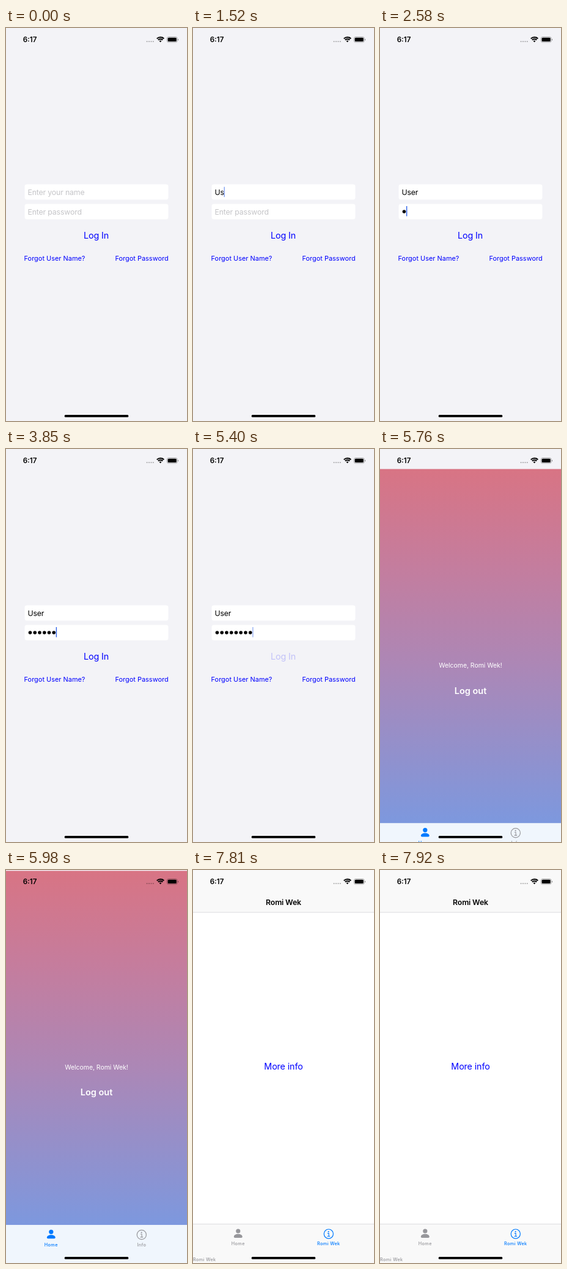
An HTML page for the animation above (8 s loop, 296x640 px).

```html
<!DOCTYPE html>
<html lang="en">
<head>
<meta charset="utf-8">
<title>Login flow</title>
<style>
html, body { margin: 0; width: 100%; height: 100%; overflow: hidden; background: #f3f3f7; }
svg { display: block; width: 296px; height: 640px; font-family: Inter, Roboto, sans-serif; }
.field { font-size: 12.3px; letter-spacing: -.012em; }
.hint { fill: #c5c5c8; }
.link { fill: #00f; }
.small { font-size: 10.95px; }
.big { font-size: 14.3px; letter-spacing: -.008em; }
.semi { font-weight: 600; }
.mid { text-anchor: middle; }
.end { text-anchor: end; }
.tab { font-size: 7.3px; font-weight: 500; letter-spacing: .05em; }
</style>
</head>
<body>
<svg viewBox="0 0 296 640">
  <defs>
    <linearGradient id="sky" x1="0" y1="0" x2="0" y2="1">
      <stop offset="0" stop-color="#d87484"/>
      <stop offset=".25" stop-color="#c47d9e"/>
      <stop offset=".5" stop-color="#ac87b6"/>
      <stop offset=".9" stop-color="#7d98de"/>
      <stop offset="1" stop-color="#7398e4"/>
    </linearGradient>
  </defs>

  <rect width="296" height="640" fill="#f3f3f7"/>
  <g id="login">
    <rect x="30.5" y="254.5" width="235" height="25" rx="4" fill="#fff"/>
    <rect x="30.5" y="286.5" width="235" height="25" rx="4" fill="#fff"/>
    <text id="nameHint" class="field hint" x="35.4" y="271.6">Enter your name</text>
    <text id="passHint" class="field hint" x="35.4" y="303.6">Enter password</text>
    <text id="name" class="field" x="35.4" y="271.6"></text>
    <g id="dots"></g>
    <rect id="caret" width="1.4" height="16.5" fill="#2f62e8"/>
    <text id="loginBtn" class="big link mid" x="147.6" y="342.8">Log In</text>
    <text class="small link" x="29.6" y="378.5">Forgot User Name?</text>
    <text class="small link end" x="265.6" y="378.5">Forgot Password</text>
  </g>

  <g id="sheet">
    <g id="home">
      <rect width="296" height="640" fill="url(#sky)"/>
      <g fill="#fff" class="mid">
        <text x="148" y="323.8" font-size="10.5" letter-spacing="-.05">Welcome, Romi Wek!</text>
        <text class="semi" x="148" y="366" font-size="14.5">Log out</text>
      </g>
    </g>
    <g id="info">
      <rect width="296" height="640" fill="#fff"/>
      <rect width="296" height="69" fill="#f9f9f9"/>
      <rect y="68.6" width="296" height=".8" fill="#d3d3d6"/>
      <text class="field semi mid" x="148" y="56.6">Romi Wek</text>
      <text class="big link mid" x="148" y="325.2">More info</text>
    </g>
    <rect id="bar" y="576.6" width="296" height="64"/>
    <rect id="barLine" y="576.3" width="296" height=".8" fill="#d3d3d6"/>
    <g id="homeTab">
      <circle cx="73.8" cy="588" r="3.6"/>
      <path d="M66.9 597.2C66.9 594.4 70 592.8 73.8 592.8S80.7 594.4 80.7 597.2Q80.7 599 79 599H68.6Q66.9 599 66.9 597.2Z"/>
      <text class="tab mid" x="73.8" y="611.2">Home</text>
    </g>
    <g id="infoTab">
      <circle cx="221.8" cy="592.6" r="7.6" fill="none" stroke="currentColor" stroke-width="1.2"/>
      <circle cx="221.6" cy="589" r="1.1"/>
      <path d="M219.9 591.6H222.1V596.4M219.6 596.5H224.2" fill="none" stroke="currentColor" stroke-width="1.1"/>
      <text id="infoLabel" class="tab mid" x="221.8" y="611.2"></text>
    </g>
    <text id="stray" class="tab" x="0" y="637" fill="#97979b">Romi Wek</text>
  </g>

  <g id="status">
    <text class="semi" x="27.7" y="23.1" font-size="11.6">6:17</text>
    <g opacity=".3">
      <circle cx="230.6" cy="22" r="1.1"/><circle cx="234" cy="22" r="1.1"/>
      <circle cx="237.4" cy="22" r="1.1"/><circle cx="240.8" cy="22" r="1.1"/>
    </g>
    <g fill="none" stroke="#000" stroke-width="2">
      <path d="M246.7 17.4A8.2 8.2 0 0 1 258.3 17.4"/>
      <path d="M248.8 19.5A5.2 5.2 0 0 1 256.2 19.5"/>
    </g>
    <path d="M250.6 21.3A2.7 2.7 0 0 1 254.4 21.3L252.5 23.3Z"/>
    <rect x="263.3" y="14.5" width="16.8" height="8.8" rx="2.7" fill="none" stroke="#000" stroke-opacity=".4" stroke-width=".8"/>
    <rect x="264.6" y="15.8" width="14.2" height="6.2" rx="1.5"/>
    <path d="M281 17.4Q282.2 18 282.2 18.9T281 20.4Z" opacity=".45"/>
    <rect x="95.6" y="630.1" width="104.8" height="3.7" rx="1.85"/>
  </g>
</svg>
<script>
const LOOP = 8000;
const el = id => document.getElementById(id);
const show = (id, on) => el(id).style.display = on ? '' : 'none';

const nameKeys = [1130, 1520, 1640, 1960];
const passKeys = [2580, 2760, 3060, 3180, 3380, 3850, 4240, 4430];
const slideTimes = [5520, 5640, 5760, 5870, 5980];
const caretSteps = [[0, 0], [500, .45], [630, 1], [1520, .6], [1640, 1],
  [4930, .45], [5040, 0], [5280, .25], [5400, .5], [5520, 1]];
const buttonSteps = [[0, 1], [5280, .2], [5520, .6], [5640, 1]];

const count = (times, t) => times.filter(k => k <= t).length;
const stepValue = (steps, t) => steps.filter(s => s[0] <= t).pop()[1];

const dots = passKeys.map((_, i) => {
  const c = document.createElementNS('http://www.w3.org/2000/svg', 'circle');
  c.setAttribute('cx', 39.5 + 7.75 * i);
  c.setAttribute('cy', 299);
  c.setAttribute('r', 2.8);
  el('dots').append(c);
  return c;
});

// Critically damped spring, sampled at the screen's refresh steps.
function sheetOffset(t) {
  const n = count(slideTimes, t);
  if (!n) return 640;
  const x = 16.7 * (slideTimes[n - 1] - 5477.3) / 1000;
  return 640 * (1 + x) * Math.exp(-x);
}

function drawLogin(t) {
  const typed = count(nameKeys, t), hidden = count(passKeys, t);
  el('name').textContent = 'User'.slice(0, typed);
  show('nameHint', !typed);
  show('passHint', !hidden);
  dots.forEach((d, i) => d.style.display = i < hidden ? '' : 'none');
  const x = hidden ? 35.2 + 7.75 * hidden
    : 35.2 + (typed ? el('name').getComputedTextLength() : 0);
  el('caret').setAttribute('x', x);
  el('caret').setAttribute('y', hidden ? 290 : 258.7);
  el('caret').setAttribute('opacity', stepValue(caretSteps, t));
  el('loginBtn').setAttribute('opacity', stepValue(buttonSteps, t));
}

function tint(id, on) {
  const color = on ? '#007aff' : '#97979b';
  el(id).setAttribute('fill', color);
  el(id).setAttribute('color', color);
}

function drawSheet(t) {
  const info = t >= 7810;
  const y = info ? 0 : sheetOffset(t);
  show('sheet', y < 640);
  el('sheet').setAttribute('transform', `translate(0 ${y})`);
  show('home', !info);
  show('info', info);
  show('stray', info);
  show('barLine', info);
  el('bar').setAttribute('fill', info ? '#f9f9f9' : '#f0f6fd');
  tint('homeTab', !info);
  tint('infoTab', info);
  el('infoLabel').textContent = info ? 'Romi Wek' : 'Info';
}

function draw(t) {
  drawLogin(t);
  drawSheet(t);
}

const start = performance.now();
function tick() {
  draw((performance.now() - start) % LOOP);
  requestAnimationFrame(tick);
}
draw(0);
requestAnimationFrame(tick);
</script>
</body>
</html>
```
